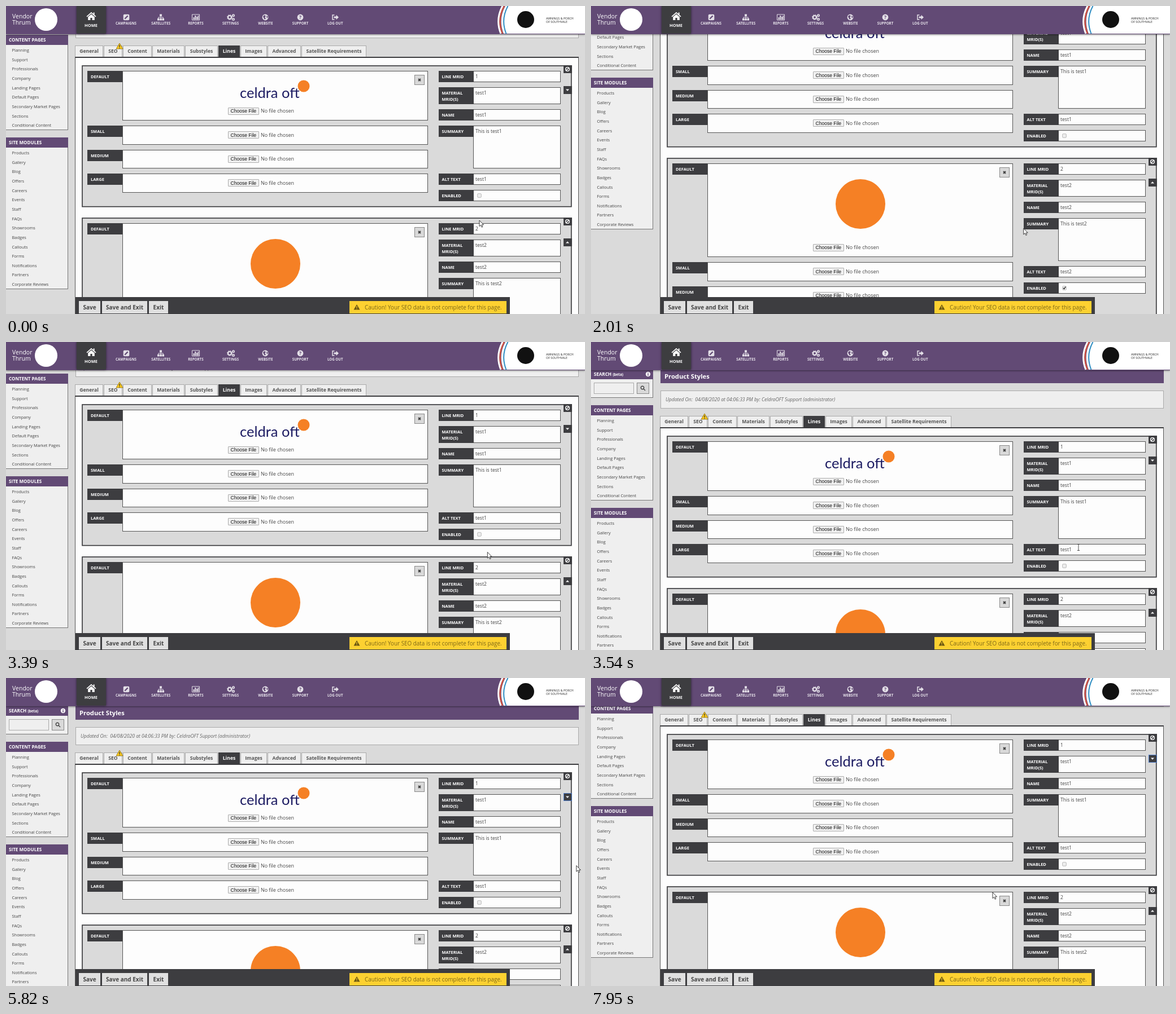
Animation, 1025 px wide and 546 px high, one loop 8000 ms. Source, as an HTML page:

```html
<!DOCTYPE html>
<html lang="en">
<head>
<meta charset="utf-8">
<title>Product Styles</title>
<style>
html, body { margin: 0; width: 100%; height: 100%; overflow: hidden; background: #dadada; }
body { font-family: "Open Sans", sans-serif; color: #444; }
div, svg { position: absolute; box-sizing: border-box; }
#stage { left: 0; top: 0; width: 1025px; height: 546px; overflow: hidden; background: #dadada; }
#page { left: 0; top: 0; width: 1025px; height: 900px; }
.t { white-space: pre; line-height: 20px; height: 20px; }
.b { font-weight: 700; }
.c { transform: translateX(-50%); }
.dark { background: #3d3d40; }
.purple { background: #624a75; }
.field { background: #fdfdfd; border: 1px solid #555; }
.list { background: #efefef; border: solid #777; border-width: 0 1px 1px 0; }
.note { background: #efefef; border: 1px solid #aaa; }
.tab { background: #efefef; border: 1px solid #aaa; }
.panel { background: #fdfdfd; border: 1px solid #555; border-top: 2px solid #3d3d40; }
.button { background: #d9d9d9; border: 1px solid #888; }
.chooser { background: #f1f1f1; border: 1px solid #adadad; border-radius: 1px; }
.action { background: #e0e0e0; }
.caution { background: #fdd131; }
.header { box-shadow: 0 1px 3px #0007; }
.home { box-shadow: 0 0 4px #0009; }
.on { background: #179fe0; }
.focus { box-shadow: inset 0 0 0 1px #4b78c4; }
svg { overflow: visible; width: 1px; height: 1px; }
</style>
</head>
<body>
<div id="stage">
  <div id="page"></div>
  <div id="top"></div>
  <div id="bar"></div>
  <svg id="cursor" fill="#fff" stroke="#111" stroke-width=".8" stroke-linejoin="round"></svg>
</div>
<script>
const $ = id => document.getElementById(id);
const box = (x, y, w, h, cls, id = '') =>
  `<div class="${cls}" id="${id}" style="left:${x}px;top:${y}px;width:${w}px;height:${h}px"></div>`;
// Text is placed by its vertical centre.
const text = (x, y, str, size, cls = '', css = '') =>
  `<div class="t ${cls}" style="left:${x}px;top:${y - 10}px;font-size:${size}px;${css}">${str}</div>`;
const icon = (x, y, body, fill = '#e4e0e8') =>
  `<svg style="left:${x}px;top:${y}px" fill="${fill}">${body}</svg>`;
const rect = (x, y, w, h) => `<rect x="${x}" y="${y}" width="${w}" height="${h}"/>`;

const WARNING = `<path d="M0-5L6 5H-6Z" fill="#fbc91d" stroke="#8a6d10" stroke-width=".8" stroke-linejoin="round"/>
  <path d="M0-2V2M0 3V4.2" stroke="#333" stroke-width="1.3"/>`;

function sidebar() {
  const heading = (y, str) => box(0, y, 110, 18, 'purple') + text(5, y + 9, str, 8.1, 'b', 'color:#fff');
  const list = (y, names) => box(0, y, 110, names.length * 16.65 + 1.5, 'list') +
    names.map((n, i) => text(10.5, y + 9 + i * 16.65, n, 7.47)).join('');
  return box(0, 67, 110, 33, 'list') + heading(49, 'SEARCH <span style="font-size:6.4px">(beta)</span>') +
    icon(100.5, 57.5, '<circle r="4.2"/><path d="M0-2.7V-1.3M0-.4V2.8" stroke="#624a75" stroke-width="1.6"/>', '#fff') +
    box(5, 73, 71, 20, 'tab') + box(81, 73, 22, 20, 'button') +
    icon(91, 82, '<circle r="2.7"/><path d="M2 2L5 5"/>', 'none" stroke="#444" stroke-width="1.4') +
    heading(113, 'CONTENT PAGES') +
    list(131, ['Planning', 'Support', 'Professionals', 'Company', 'Landing Pages', 'Default Pages',
      'Secondary Market Pages', 'Sections', 'Conditional Content']) +
    heading(295, 'SITE MODULES') +
    list(313, ['Products', 'Gallery', 'Blog', 'Offers', 'Careers', 'Events', 'Staff', 'FAQs', 'Showrooms',
      'Badges', 'Callouts', 'Forms', 'Notifications', 'Partners', 'Corporate Reviews']);
}

function tabs() {
  const items = [['General', 122, 50], ['SEO', 173, 33], ['Content', 207, 51], ['Materials', 259, 57],
    ['Substyles', 317, 58], ['Lines', 376, 38], ['Images', 415, 47], ['Advanced', 463, 59],
    ['Satellite Requirements', 523, 115]];
  return items.map(([name, x, w]) => {
    const active = name === 'Lines';
    return box(x, 132, w, 21, active ? 'dark' : 'tab') +
      text(x + w / 2, 142, name, 8.6, 'b c', `color:${active ? '#fff' : '#555'}`);
  }).join('') + icon(201, 133, WARNING);
}

function lineItem(n, top, imageHeight, picture) {
  const label = (x, y, str, h = 20) => box(x, top + y, 62, h, 'dark') +
    str.split('|').map((s, i) => text(x + 6, top + y + 10 + i * 10.7, s, 7.47, 'b', 'color:#fff')).join('');
  const chooser = y => box(393, top + y - 6.5, 55, 13, 'chooser') +
    text(420.3, top + y, 'Choose File', 8.55, 'c', 'font-family:Liberation Sans,Arial,sans-serif;color:#111') +
    text(451, top + y, 'No file chosen', 8.9);
  const file = (y, str, h = 33.5) => box(206, top + y, 541, h, 'field') + label(144, y, str) + chooser(y + h - 16.8);
  const input = (y, name, value, h = 20, labelHeight = 20) => box(827, top + y, 155, h, 'field') +
    label(765.5, y, name, labelHeight) + text(831, top + y + 10, value, 8.55);
  const gap = imageHeight + 19;
  const check = n === 2 ? '<path d="M-2-.3L-.5 1.7L2.3-2.3" fill="none" stroke="#222" stroke-width="1.3"/>' : '';
  const arrow = n === 1 ? 'M-3-1.4H3L0 1.7Z' : 'M-3 1.4H3L0-1.7Z';
  return icon(134.9, top + .9, rect(0, 0, 865.8, imageHeight + 161.7), '#dadada" stroke="#3d3d40" stroke-width="1.7') +
    file(10, 'DEFAULT', imageHeight) + picture +
    box(723, top + 17, 17.5, 17.5, 'button') +
    icon(731.7, top + 26, '<path d="M-2-2L2 2M2-2L-2 2" stroke="#444" stroke-width="1.9"/>') +
    file(gap, 'SMALL') + file(gap + 42.6, 'MEDIUM') + file(gap + 85.2, 'LARGE') +
    input(10, 'LINE MRID', n) + input(39, 'MATERIAL|MRID(S)', 'test' + n, 30, 30) +
    input(78, 'NAME', 'test' + n) + input(107, 'SUMMARY', 'This is test' + n, 76) +
    input(192, 'ALT TEXT', 'test' + n) + input(221, 'ENABLED', '') +
    icon(838, top + 231, `<rect x="-3.3" y="-3.3" width="6.6" height="6.6" rx="1" fill="#eee" stroke="#aaa" stroke-width=".8"/>${check}`) +
    box(987, top, 14.5, 14, 'dark') +
    icon(993.7, top + 7, '<circle r="3.4"/><path d="M-2.3 2.3L2.3-2.3"/>', 'none" stroke="#fff" stroke-width="1.3') +
    box(987, top + 37, 14.5, 14, 'dark', 'move' + n) + icon(993.7, top + 44, `<path d="${arrow}"/>`, '#fff') +
    `<div id="tip${n}">` +
    icon(942, top + 44, '<rect x="-40.5" y="-6.7" width="80.5" height="13.4" rx="2.5"/><path d="M39-3L43 0L39 3Z"/>', '#151515') +
    text(941.5, top + 44, 'Move Item ' + (n === 1 ? 'Down' : 'Up'), 6.95, 'b c', 'color:#fff') + '</div>';
}

const ORANGE = '#f58025';
$('page').innerHTML = sidebar() +
  box(122.5, 44, 891, 30, 'purple') + text(130, 61.5, 'Product Styles', 11.2, 'b', 'color:#fff') +
  box(122.5, 87, 891, 31.5, 'note') +
  text(132, 102.5, 'Updated On:  04/08/2020 at 04:06:33 PM by: CeldraOFT Support (administrator)', 8.55, '', 'font-style:italic;color:#666') +
  tabs() + box(122, 152, 891.5, 740, 'panel') +
  lineItem(1, 167, 88, text(414, 215, 'celdra oft', 25.5, '', 'font-family:Lato,sans-serif;color:#1c1b62') +
    icon(527, 204, '<circle r="10.5"/>', ORANGE)) +
  lineItem(2, 437, 166, icon(477, 519, '<circle r="44"/>', ORANGE));

const P = '#624a75';
const nav = {
  CAMPAIGNS: `<rect x="-5.3" y="-5.3" width="10.6" height="10.6" rx="2"/><path d="M-2.7 2.7L2.6-2.6" stroke="${P}" stroke-width="2.2"/>`,
  SATELLITES: rect(-2, -5.5, 4, 3.6) + rect(-6, 2, 3.6, 3.6) + rect(-1.8, 2, 3.6, 3.6) + rect(2.4, 2, 3.6, 3.6) +
    '<path d="M0-2V2M-4.2 2V0H4.2V2" fill="none" stroke="#e4e0e8"/>',
  REPORTS: '<path d="M-6.5-5H6.5V5H-6.5Z" fill="none" stroke="#e4e0e8"/>' + rect(-4.5, 0, 2, 4) + rect(-1.7, -3, 2, 7) + rect(1.2, -1, 2, 5) + rect(3.7, -3, 1.5, 7),
  SETTINGS: '<g fill="none" stroke="#e4e0e8"><circle cx="-2" r="3" stroke-width="2.2"/><circle cx="-2" r="4.5" stroke-dasharray="1.7 1.83"/><circle cx="4.5" cy="-3.3" r="1.7" stroke-width="1.6"/><circle cx="4.5" cy="3.5" r="1.7" stroke-width="1.6"/></g>',
  WEBSITE: `<circle r="5.4"/><path d="M-4-2L-1-4L1-2L-1 0L1 2L-1 4L-3 1ZM2-3L5-1L3 2Z" fill="${P}"/>`,
  SUPPORT: `<circle r="5.4"/><text y="3" font-size="8.5" font-weight="700" text-anchor="middle" fill="${P}">?</text>`,
  'LOG OUT': '<path d="M-1.5-4H-5V4H-1.5" fill="none" stroke="#e4e0e8" stroke-width="1.5"/><path d="M-2.5-1.6H1.5V-4.3L6 0L1.5 4.3V1.6H-2.5Z"/>'
};
const arc = (x, color, w) => `<path d="M${x} 0Q${x - 13} 24 ${x - 3} 49" fill="none" stroke="${color}" stroke-width="${w}"/>`;

$('top').innerHTML =
  box(0, 0, 1025, 49.5, 'purple header') +
  text(11, 17.5, 'Vendor', 10.5, '', 'color:#fff') + text(11, 29, 'Thrum', 10.5, '', 'color:#fff') +
  icon(70.5, 23.5, '<circle r="20"/>', '#fff') +
  box(125, 0, 52, 49, 'dark home') +
  icon(150.5, 18, '<path d="M-8.5 .3L0-7.2L3.6-4V-6.5H5.6V-2.2L8.5 .3L7.4 1.5L0-5L-7.4 1.5ZM-5.8 1.6L0-3.5L5.8 1.6V7H1.6V3H-1.6V7H-5.8Z"/>', '#fff') +
  text(150.5, 34, 'HOME', 7.47, 'b c', 'color:#fff') +
  Object.keys(nav).map((name, i) => icon(212.5 + i * 61.7, 19.5, nav[name]) +
    text(212.5 + i * 61.7, 30.5, name, 6.2, 'b c', 'color:#e8e4ec')).join('') +
  icon(0, 0, '<path d="M884 0Q871 24 881 49H1025V0Z"/>' + arc(879, '#fff', 3) + arc(882, '#e2553b', 2) + arc(886, '#fff', 2) + arc(888.5, '#2f8fc4', 2), '#fff') +
  icon(920, 24, '<circle r="15"/>', '#111') +
  text(956, 21.5, 'AWNINGS &amp; PORCH', 5.3, '', 'color:#222') + text(956, 27.5, 'OF SOUTHVALE', 5.3, '', 'color:#222');

const action = (x, w, str) => box(x, 523, w, 22, 'action') + text(x + w / 2, 533.5, str, 10, 'b c');
$('bar').innerHTML = box(122.5, 516, 769.5, 30, 'dark') +
  action(129, 38, 'Save') + action(170, 80, 'Save and Exit') + action(253, 34, 'Exit') +
  box(608, 523, 278, 22, 'caution') +
  icon(621, 533.5, '<path d="M0-5L5.5 4.5H-5.5Z"/><path d="M0-2V1.5M0 2.4V3.6" stroke="#fdd131" stroke-width="1.2"/>', '#6b5812') +
  text(635, 533.5, 'Caution! Your SEO data is not complete for this page.', 9.9, '', 'color:#7c6718');

const POINTERS = {
  arrow: '<path d="M0 0V10.6L2.5 8.4L4.2 12.2L5.9 11.5L4.3 7.8H7.6Z"/>',
  beam: '<path d="M-2.2-5.5H2.2M0-5.5V5.5M-2.2 5.5H2.2" stroke="#222"/>',
  hand: '<path d="M-1 .8Q0-.6 1.2 .8V5L2.6 4.7L3.6 5.2L5 5L5.8 5.8L7.2 6V9.5L6 13H-.3L-3.8 8.4Q-3.8 7-2.3 7.3L-1 8.6Z"/><path d="M1.2 5V7M3.5 5.2V7M5.7 5.8V7.2" fill="none" stroke-width=".6"/>'
};

const BURSTS = [[0, 0, 1], [120, 430, 3], [840, 1860, 8], [2010, 2950, 8], [3090, 4060, 8], [4200, 4200, 1],
  [5190, 5190, 1], [5430, 6120, 6], [6270, 6270, 1], [6960, 7100, 2], [7410, 7950, 5]];
const SCROLL = [[1140, 62], [1277, 85], [1570, 168], [3090, 168], [3506, 1], [3645, 0], [7680, 0], [7950, 68]];
const PATH = [[60, 838, 380], [430, 849, 388], [700, 849, 388], [1277, 810, 429], [1860, 800, 430], [2280, 704, 330],
  [2550, 880, 206], [2690, 1014, 313], [2820, 920, 488], [2950, 838, 384], [3180, 838, 384], [3506, 863, 364],
  [4060, 994, 213], [4200, 994, 211], [5400, 994, 211], [5750, 1012, 350], [6120, 994, 480], [6960, 994, 480],
  [7100, 996, 484], [7300, 996, 484], [7680, 711, 380]];

function snap(t) {
  const [a, b, n] = BURSTS.findLast(burst => burst[0] <= t);
  if (t >= b) return b;
  const step = (b - a) / (n - 1);
  return a + Math.floor((t - a) / step + 1e-6) * step;
}

function along(keys, t, column) {
  const i = keys.findIndex(key => key[0] > t);
  if (i < 0) return keys[keys.length - 1][column];
  if (i === 0) return keys[0][column];
  const p = keys[i - 1], q = keys[i];
  return p[column] + (q[column] - p[column]) * (t - p[0]) / (q[0] - p[0]);
}

let pointer = '';
function frame(now) {
  const t = snap(now % 8000);
  const down = t >= 4060 && t < 5430, up = t >= 6270 && t < 7410;
  $('page').style.transform = `translateY(${-Math.round(along(SCROLL, t, 1))}px)`;
  $('tip1').style.display = down ? '' : 'none';
  $('tip2').style.display = up ? '' : 'none';
  $('move1').className = down ? 'on' : t >= 5430 ? 'dark focus' : 'dark';
  $('move2').className = up ? 'on' : 'dark';
  const kind = down || t >= 6120 && t < 7410 ? 'hand' : t > 3400 && t < 3700 ? 'beam' : 'arrow';
  if (kind !== pointer) $('cursor').innerHTML = POINTERS[pointer = kind];
  $('cursor').style.transform = `translate(${along(PATH, t, 1)}px,${along(PATH, t, 2)}px)`;
  requestAnimationFrame(frame);
}
requestAnimationFrame(frame);
</script>
</body>
</html>
```
